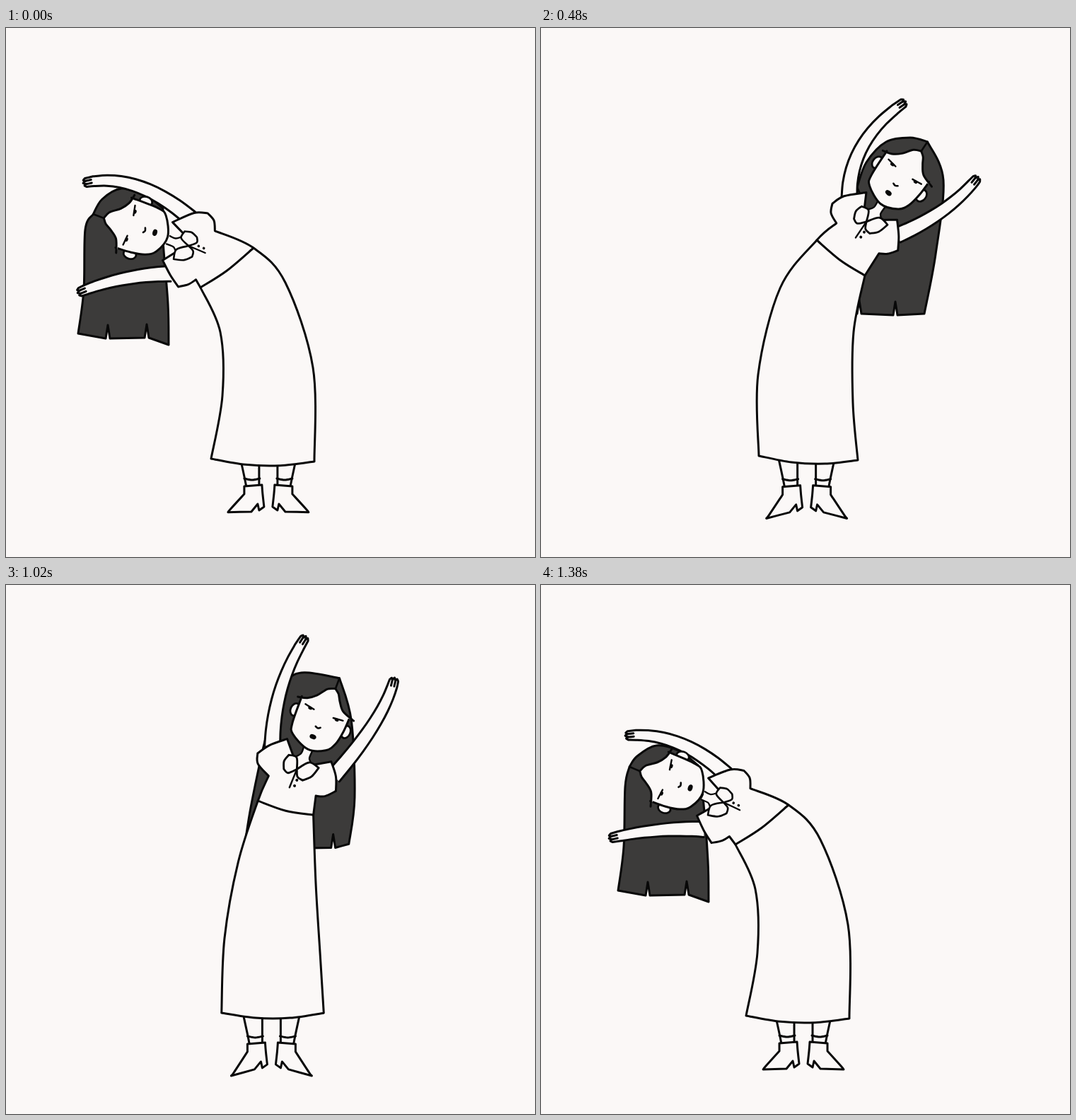
Write an HTML page with a canvas that moves like this. It is 748 px wide and 748 px high and loops after 1440 ms.

```html
<!DOCTYPE html>
<html lang="en">
<head>
<meta charset="utf-8">
<title>Side stretch</title>
<style>
  html, body { margin: 0; width: 100%; height: 100%; overflow: hidden; background: #fbf8f7; }
  canvas { display: block; width: 100vw; height: 100vh; }
</style>
</head>
<body>
<canvas id="stage" width="748" height="748"></canvas>
<script>
const PAPER = '#fbf8f7', INK = '#080808', HAIR = '#3c3b3a';
const STEP = 60, STEPS = 24, AXIS = 375;
const ctx = document.getElementById('stage').getContext('2d');

const mix = (a, b, k) => a + (b - a) * k;
const mixPt = (a, b, k) => a.map((v, i) => mix(v, b[i], k));
const mixPts = (a, b, k) => a.map((p, i) => mixPt(p, b[i], k));
const clamp = v => Math.min(1, Math.max(0, v));

function pts(text) {
  const n = text.split(' ').map(Number), out = [];
  for (let i = 0; i < n.length; i += 2) out.push([n[i], n[i + 1]]);
  return out;
}
const runs = text => text.split('|').map(pts);

// Catmull-Rom through each run; runs meet in corners.
function trace(list) {
  const path = new Path2D();
  let last = null;
  for (const run of list) {
    const p = last ? [last, ...run] : run;
    if (!last) path.moveTo(...p[0]);
    for (let i = 0; i < p.length - 1; i++) {
      const b = p[i], c = p[i + 1], a = p[i - 1] || b, d = p[i + 2] || c;
      path.bezierCurveTo(
        b[0] + (c[0] - a[0]) / 6, b[1] + (c[1] - a[1]) / 6,
        c[0] - (d[0] - b[0]) / 6, c[1] - (d[1] - b[1]) / 6, ...c);
    }
    last = p[p.length - 1];
  }
  return path;
}

function draw(list, fill, width = 3) {
  const path = trace(list);
  if (fill) {
    ctx.fillStyle = fill;
    ctx.fill(path);
  }
  if (width) {
    ctx.lineWidth = width;
    ctx.stroke(path);
  }
}

function oval(x, y, rx, ry, fill = INK) {
  ctx.fillStyle = fill;
  ctx.beginPath();
  ctx.ellipse(x, y, rx, ry, 0, 0, Math.PI * 2);
  ctx.fill();
}

function placed([x, y], angle, scale, paint) {
  ctx.save();
  ctx.translate(x, y);
  ctx.rotate(angle);
  ctx.scale(scale, scale);
  paint();
  ctx.restore();
}

// Body keys: deep bend, half bend, upright.
const skirts = [
  '350 311 395 360 434 480 436 613 275 367 303 430 306 520 290 609',
  '360 300 412 368 443 490 442 605 292 350 308 430 309 530 302 611',
  '412 308 427 405 440 505 447 605 328 312 314 420 304 520 300 602'
].map(pts);
const hairs = [
  '222 255 196 235 163 227 136 242 119 285 117 370 109 432 151 439 206 438 237 448 236 390 229 300',
  '303 225 290 190 262 161 228 155 181 215 192 320 208 404 249 406 300 404 335 396 320 340 298 255',
  '424 205 420 155 402 120 382 107 305 180 292 290 296 346 308 353 428 356 452 338 449 300 438 235'
].map(pts);

// Sleeves around the collar: upright, bent.
const sleevesR = ['10 -17 35 -35 51 -22 66 -6 60 9 33 22', '13 -13 22 -34 46 -11 53 7 47 19 34 26'].map(pts);
const sleevesL = ['-22 -15 -48 -30 -61 -14 -66 7 -52 20 -38 22', '-16 -14 -33 -26 -48 -8 -59 9 -50 21 -40 28'].map(pts);

const face = runs('-36 -10 -36 13 -33 33 -24 47 0 56 28 45 35 31 38 -9');
const hairline = runs('-43 -7 -24 -13 -14 -24 -8 -33 -1 -38|9 -33 19 -19 30 -10 43 -6');
const neck = runs('3 -34 3 -24 9 -16|0 0|-15 -14 -11 -22 -11 -34');
const collarR = runs('0 0|7 -16 19 -15|22 -4 18 7|10 10 0 0');
const collarL = runs('0 0|-13 -16 -29 -14|-24 2 -14 12|-5 10 0 0');
const shoe = '341 649 366 647|367 660 369 678|362 683|360 674|351 685';

// From deepest bend to upright: bend stage, head x y turn, then mid and tip of each arm.
const poses = [
  { key: 0, head: [175, 279, -73], up: '184 223 111 219', low: '165 355 103 374' },
  { key: 0, head: [176, 275, -70.5], up: '193 223 121 213', low: '165 347 98 358' },
  { key: .25, head: [187, 257, -62], up: '218 204 148 182', low: '157 322 88 322' },
  { key: .5, head: [200.5, 238, -52], up: '244 186 177 153', low: '163 289 104 283' },
  { key: 1, head: [236, 204, -37], up: '295 166 236 105', low: '181 257 133 212' },
  { key: 1.65, head: [300.5, 181, -24], up: '361 147 327 74', low: '229 195 201 133' },
  { key: 2, head: [364.5, 162, 0], up: '437 157 435 71', low: '292 158 293 79' }
];

function keyed(list, key) {
  const i = Math.min(1, Math.floor(key));
  return mixPts(list[i], list[i + 1], key - i);
}

function drawHair(key, part, sway) {
  const swing = key < 1 ? 4 * key * (1 - key) : 0;
  const p = keyed(hairs, key).map(([x, y], i) => [x - 6 * swing + (i > 3 ? sway : 0), y - 10 * swing]);
  const [n1, n2] = [p[7], p[8]];
  const slit = ([x, y]) => [[[x - 3, y]], [[x, y - 19]], [[x + 3, y]]];
  draw([
    p.slice(0, 4).concat([part]), p.slice(4, 7), ...slit(n1), ...slit(n2),
    [p[9]], [p[10], p[11], p[0]]
  ], HAIR);
}

// Tapered tube through a middle point, ending in three fingers.
function drawArm(base, text) {
  const [mid, tip] = pts(text), bend = mid.map((v, i) => 2 * v - (base[i] + tip[i]) / 2);
  const at = (t, side, ahead = 0) => {
    const a = mixPt(base, bend, t), b = mixPt(bend, tip, t), c = mixPt(a, b, t);
    const dx = b[0] - a[0], dy = b[1] - a[1], len = Math.hypot(dx, dy);
    const half = mix(11, 6.5, t) * side;
    return [c[0] + (dx * ahead - dy * half) / len, c[1] + (dy * ahead + dx * half) / len];
  };
  const side = s => Array.from({ length: 8 }, (_, i) => at(i * .13, s));
  draw([
    side(1), [at(1, .95, -2)], [at(1, .6, 1), at(1, .33, -2)],
    [at(1, 0, 2), at(1, -.33, -2)], [at(1, -.6, 1), at(1, -.95, -2)], side(-1).reverse()
  ], PAPER);
  for (const s of [-.35, .35]) draw([[at(1, s, -2), at(1, s, -10)]]);
}

function drawFeet(lean) {
  const toe = 695 - 9 * lean;
  const foot = [...runs(shoe), [[318, toe]], [[322, toe - 5], [341, 660]], [[341, 649]]];
  for (const s of [1, -1]) {
    ctx.save();
    ctx.translate(AXIS - 4 * lean, 0);
    ctx.scale(s, 1);
    ctx.translate(-AXIS, -lean);
    draw([[[336, 612], [341, 635], [344, 650]]]);
    draw([[[362, 612], [362, 650]]]);
    draw([[[341, 638], [352, 640], [363, 638]]]);
    draw(foot, PAPER);
    ctx.restore();
  }
}

function drawDress(skirt, R, L) {
  const [wr, r1, r2, hr, wl, l1, l2, hl] = skirt;
  const sag = (a, b, k, d) => [mix(a[0], b[0], k), mix(a[1], b[1], k) + d];
  draw([
    [R[0], R[1]], [R[2], R[3]], [R[4], R[5]], [wr, r1, r2, hr],
    [sag(hr, hl, .33, 7), sag(hr, hl, .67, 7), hl], [l2, l1, wl], [L[5]],
    [L[4], L[3]], [L[2], L[1]], [L[0]], [R[0]]
  ], PAPER);
  draw([[wr, sag(wr, wl, .5, 4), wl]]);
}

function drawCollar(side) {
  draw(neck, PAPER, 2.6);
  draw(collarR, PAPER);
  draw(collarL, PAPER);
  draw([[[0, 0], [0, 29]]], null, 2.6);
  for (const y of [15, 24]) oval(6 * side, y, 2.1, 2.1);
}

function drawHead() {
  for (const s of [-1, 1]) {
    oval(39 * s, 12, 8, 10.5);
    oval(39 * s, 12, 5.2, 7.7, PAPER);
  }
  draw(face, PAPER);
  draw(hairline, PAPER);
  draw([[[-1, -38], [0, -54]]], null, 2.6);
  for (const s of [-1, 1]) {
    draw([[[29 * s, -1], [22 * s, 0], [15 * s, 1]]], null, 2.4);
    oval(20.5 * s, 1.5, 3, 2.2);
  }
  draw([[[-4, 21], [-1, 23], [3, 22]]], null, 2.6);
  oval(.5, 37, 4.8, 3.3);
}

function drawFigure(phase, mirrored) {
  const { key, head, up, low } = poses[phase];
  const [hx, hy, deg] = head, turn = deg * Math.PI / 180, lean = -deg / 71;
  const chest = turn * .92, c = Math.cos(chest), s = Math.sin(chest);
  const collar = [hx + 5.5 * c - 88 * s, hy + 5.5 * s + 88 * c];
  const onChest = ([x, y]) => [collar[0] + x * c - y * s, collar[1] + x * s + y * c];
  const fold = clamp((-deg - 10) / 30);
  const R = mixPts(...sleevesR, fold).map(onChest), L = mixPts(...sleevesL, fold).map(onChest);

  ctx.save();
  if (mirrored) {
    ctx.translate(AXIS * 2, 0);
    ctx.scale(-1, 1);
  }
  drawHair(key, [hx + 54 * Math.sin(turn), hy - 54 * Math.cos(turn)], phase ? 0 : -7);
  drawArm(mixPt(R[1], R[3], .5), up);
  drawArm(mixPt(L[1], L[3], .5), low);
  drawFeet(1 - key / 2 > .5 ? lean : lean * .3);
  drawDress(keyed(skirts, key), R, L);
  placed(collar, chest, 1 - .12 * lean, () => drawCollar(mirrored ? -1 : 1));
  placed(head, turn, 1, drawHead);
  ctx.restore();
}

function render(step) {
  const half = STEPS / 2, fromLeft = Math.min(step, STEPS - step);
  const right = fromLeft > half / 2;
  ctx.fillStyle = PAPER;
  ctx.fillRect(0, 0, 748, 748);
  drawFigure(right ? half - fromLeft : fromLeft, right);
}

ctx.strokeStyle = INK;
ctx.lineCap = ctx.lineJoin = 'round';

let shown = -1;
function tick(now) {
  const step = Math.floor(Math.max(now, 0) / STEP) % STEPS;
  if (step !== shown) render(shown = step);
  requestAnimationFrame(tick);
}
render(0);
requestAnimationFrame(tick);
</script>
</body>
</html>
```
